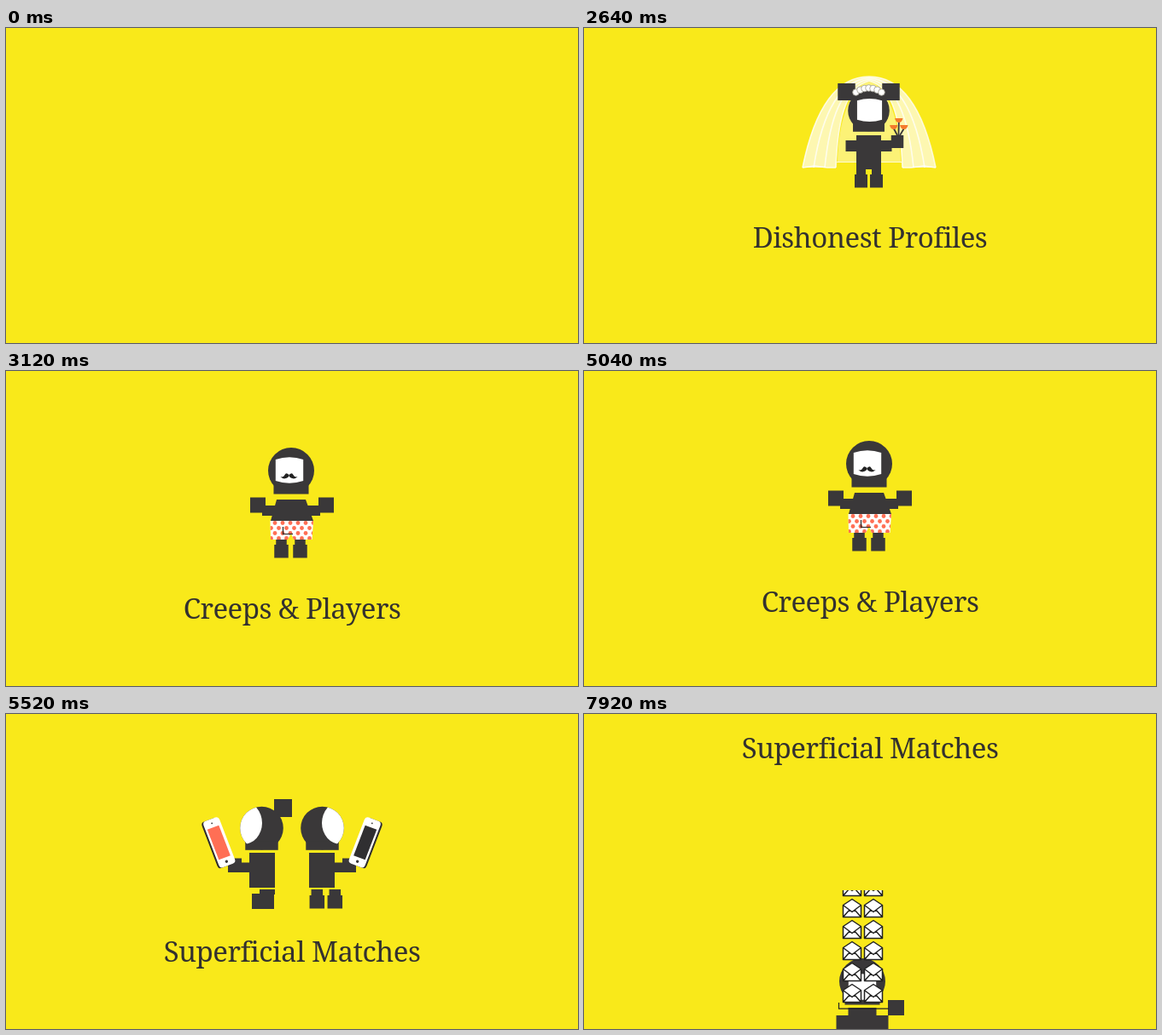
An HTML page with a canvas for the animation above (8 s loop, 670 by 370 pixels).

```html
<!DOCTYPE html>
<html lang="en">
<head>
<meta charset="utf-8">
<title>Dating troubles</title>
<style>
  html, body { margin: 0; width: 100%; height: 100%; overflow: hidden; background: #f9e91a; }
  canvas { display: block; }
</style>
</head>
<body>
<canvas id="stage" width="670" height="370"></canvas>
<script>
const ctx = document.getElementById('stage').getContext('2d');
const W = 670, H = 370, LOOP = 8000, GAP = 436;
const YELLOW = '#f9e91a', DARK = '#3a3839', INK = '#33312f', ORANGE = '#f47a2c', CORAL = '#ff6f55';
const veilWhite = alpha => `rgba(255,255,255,${alpha})`;

// Each scroll step: start time and duration in ms.
const MOVES = [[270, 530], [2547, 530], [4995, 530], [7581, 640]];

const swing = t => 0.5 - Math.cos(Math.PI * Math.min(1, Math.max(0, t))) / 2;
const scrollAt = ms => MOVES.reduce((sum, [start, span]) => sum + GAP * swing((ms - start) / span), 0);

function block(cx, top, w, h, color = DARK) {
  ctx.fillStyle = color;
  ctx.fillRect(cx - w / 2, top, w, h);
}

// Two equal blocks on either side of cx.
function pair(cx, gap, top, w, h) {
  block(cx - gap, top, w, h);
  block(cx + gap, top, w, h);
}

function disc(x, y, r, color) {
  ctx.fillStyle = color;
  ctx.beginPath();
  ctx.arc(x, y, r, 0, Math.PI * 2);
  ctx.fill();
}

function shape(d, color) {
  ctx.fillStyle = color;
  ctx.fill(new Path2D(d));
}

function line(d, color, width) {
  ctx.strokeStyle = color;
  ctx.lineWidth = width;
  ctx.stroke(new Path2D(d));
}

function mirrored(cx, draw) {
  ctx.save();
  ctx.translate(2 * cx, 0);
  ctx.scale(-1, 1);
  draw();
  ctx.restore();
}

function both(cx, draw) {
  draw();
  mirrored(cx, draw);
}

function caption(text) {
  ctx.font = '33px "Roboto Slab", "Noto Serif", serif';
  ctx.letterSpacing = '-0.5px';
  ctx.textAlign = 'center';
  ctx.fillStyle = INK;
  ctx.fillText(text, 335, 290.5);
}

function helmet(x, y, r) {
  disc(x, y, r, DARK);
  block(x, y + 0.6 * r, 1.52 * r, 0.42 * r);
}

function visor(x, y, r) {
  const half = 0.6 * r, rise = 0.48 * r, bulge = 0.2 * r;
  shape(`M${x - half},${y - rise} q${half},${-bulge} ${2 * half},0 v${2 * rise - 1}
    q${-half},${bulge} ${-2 * half},0 Z`, '#fff');
}

function legs(cx, gap, top, w) {
  pair(cx, gap, top, w, 7);
  pair(cx, gap, top + 7, w + 4, 15.5);
}

// Curve of a veil fold from hem to crown; k runs from the outer edge to the inner.
const fold = k => `M${256 + 39 * k},197 C${269 + 28 * k},${133 + 12 * k} ${293 + 12 * k},${90 + 13 * k} 334,${90 + 5 * k}`;

function veilSide() {
  shape(fold(0) + ' V95' + ' C305,103 297,145 295,197 Z', veilWhite(0.66));
  for (let k = 0; k <= 3; k++) line(fold(k / 3), veilWhite(0.75), 1.6);
  line('M256,197 l14,-2 l15,2 h10', veilWhite(0.8), 1.5);
}

function bouquet() {
  for (let u = -1; u <= 1; u++) {
    const x = 368.8 + 6 * u, y = 139 + 8 * u * u;
    line(`M${368.5 + u},160 L${x},${y + 4}`, DARK, 1.8);
    shape(`M${x - 4.7},${y} h9.4 q-1,5 -4.7,5 t-4.7,-5 Z`, ORANGE);
  }
}

function bride() {
  const cx = 333.5;
  shape('M297,190 C298,140 312,103 334,95 C356,103 370,140 371,190 Z', veilWhite(0.4));
  line('M296,190.5 H372', veilWhite(0.8), 1.2);
  both(334, veilSide);

  pair(cx, 26, 98, 20.5, 20);
  helmet(cx, 130, 24.3);
  visor(cx + 1, 130, 24.3);
  for (let u = -1; u <= 1.01; u += 1 / 3) {
    disc(cx + 15 * u, 103.5 + 5 * u * u, 3.8, '#fff');
    ctx.strokeStyle = '#a9a69c';
    ctx.lineWidth = 0.9;
    ctx.stroke();
  }
  block(cx, 159, 29, 40);
  pair(cx, 20.5, 165, 13, 13);
  block(367, 159, 14.5, 15);
  legs(cx, 9, 198, 11);
  bouquet();
  caption('Dishonest Profiles');
}

function halfMoustache() {
  shape('M331.5,122 q-3.5,-3.5 -5,0 t-5,2 q2.5,3.5 6.5,2 t3.5,-4 Z', '#222');
}

function player() {
  const cx = 334;
  helmet(cx, 117, 27);
  visor(cx - 2, 117, 27);
  both(331.5, halfMoustache);

  shape('M317,151 H351 L360,176 H310 Z', DARK);
  pair(cx, 26, 158, 16, 12);
  pair(cx + 1, 40, 148.5, 18, 18);
  legs(cx - 0.5, 11, 197, 12.5);

  const shorts = 'M309.5,176 H360 L358.5,198 H337 L334,191 L330,198 H310 Z';
  shape(shorts, '#fff');
  ctx.save();
  ctx.clip(new Path2D(shorts));
  for (let row = 0; row < 4; row++)
    for (let col = 0; col < 7; col++)
      disc(315 + col * 9 - (row % 2) * 4.5, 178.5 + row * 6, 2.4, CORAL);
  ctx.restore();
  line('M324.5,183 V191.5 H336', '#222', 1.2);
  caption('Creeps & Players');
}

function slab(x, color) {
  ctx.fillStyle = color;
  ctx.beginPath();
  ctx.roundRect(x - 10, -29, 20, 58, 4);
  ctx.fill();
}

function phone(screen) {
  ctx.save();
  ctx.translate(249.3, 151);
  ctx.rotate(-0.365);
  slab(-1.5, '#2e2c2d');
  slab(0.5, '#fff');
  block(0, -19, 14.5, 38, screen);
  disc(0.5, 24, 1.7, DARK);
  disc(0.5, -24, 0.9, DARK);
  ctx.restore();
}

function swiper(screen) {
  const cx = 300, cy = 134, r = 25.3;
  helmet(cx - 0.5, cy, r);
  ctx.save();
  ctx.beginPath();
  ctx.arc(cx - 0.5, cy, r, 0, Math.PI * 2);
  ctx.clip();
  ctx.beginPath();
  ctx.ellipse(cx - 22, cy - 6, 22, 25, 0, 0, Math.PI * 2);
  ctx.fillStyle = '#fff';
  ctx.fill();
  ctx.restore();
  block(cx, 163, 30, 41);
  block(cx - 20, 174.5, 11, 11.5);
  block(cx - 32, 169.5, 16, 16.5);
  phone(screen);
}

function matches() {
  block(324.5, 100, 21, 21);
  swiper(CORAL);
  block(306, 206, 18, 6);
  block(301, 211, 26, 18);
  mirrored(335, () => swiper('#302f31'));
  legs(374.8, 10.5, 206, 13.5);
  caption('Superficial Matches');
}

function envelope(x, y) {
  ctx.lineJoin = 'round';
  const house = `M${x},${y} l10.5,-7 l10.5,7 v14 h-21 Z`;
  shape(house, '#fff');
  line(house + ' l10.5,8 l10.5,-8 m0,14 l-7.5,-8.5 m-6,0 l-7.5,8.5', '#222', 1.5);
}

function inbox() {
  const cx = 326;
  helmet(cx, 117, 27);
  visor(cx, 124, 27);
  block(cx, 148, 33, 10);
  block(cx, 157, 61, 33);
  block(365.5, 139, 19, 18);
  line('M298.5,142 V149.2 H357', '#222', 1.2);
  ctx.save();
  ctx.beginPath();
  ctx.rect(295, 10, 65, 140);
  ctx.clip();
  for (let row = 0; row < 6; row++)
    for (let col = 0; col < 2; col++) envelope(303.5 + col * 25, row * 25 + 2.5);
  ctx.restore();
}

const slides = [bride, player, matches, inbox];

function render(ms) {
  ctx.fillStyle = YELLOW;
  ctx.fillRect(0, 0, W, H);
  const scroll = scrollAt(ms);
  slides.forEach((draw, i) => {
    const y = Math.round((i + 1) * GAP - scroll);
    if (Math.abs(y) >= H) return;
    ctx.save();
    ctx.translate(0, y);
    draw();
    ctx.restore();
  });
}

function tick() {
  render(performance.now() % LOOP);
  requestAnimationFrame(tick);
}
tick();
</script>
</body>
</html>
```
